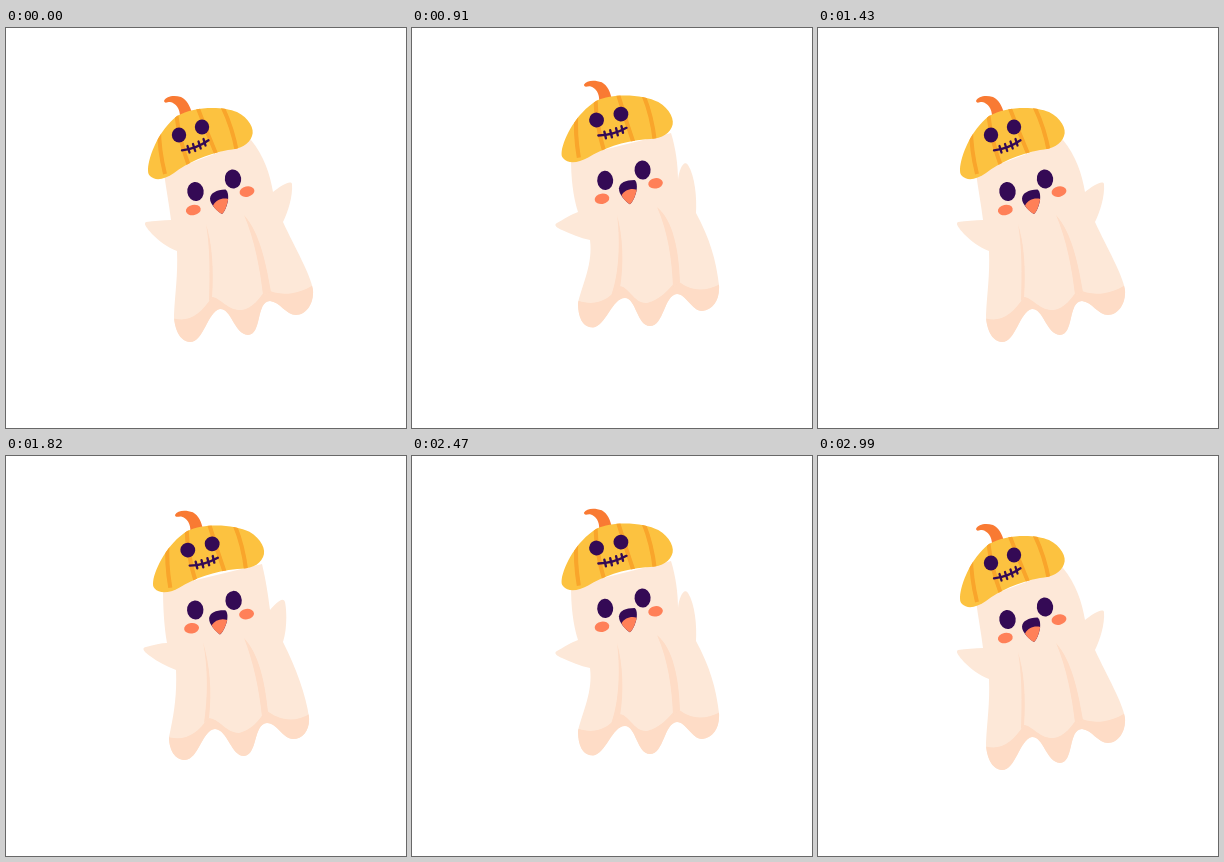
Write an HTML page that moves like this. It is 400 px wide and 400 px high and loops after 3.12 s.

```html
<!DOCTYPE html>
<html lang="en">
<head>
<meta charset="utf-8">
<title>Waving ghost</title>
<style>
  html, body { margin: 0; width: 100%; height: 100%; overflow: hidden; background: #fff; }
  svg { display: block; width: 100vw; height: 100vh; }
  .dark { fill: #340a55; }
  .coral { fill: #ff8058; }
  .shade { fill: #fedcc6; }
</style>
</head>
<body>
<svg viewBox="0 0 400 400">
  <defs>
    <clipPath id="bodyClip"><path class="outline"/></clipPath>
    <clipPath id="hatClip"><path id="hatShape" d="M142 141C143 127 153 102 171 88C188 78 217 78 231 84C243 90 249 101 246 108C243 117 234 121 222 122C200 126 181 135 168 145C158 152 149 153 144 148C142 146 142 144 142 141Z"/></clipPath>
  </defs>

  <path class="outline" fill="#fde8d8"/>
  <g class="shade" clip-path="url(#bodyClip)">
    <path id="hem"/>
    <path id="foldLeft"/>
    <path id="foldRight"/>
  </g>

  <g id="face">
    <g class="dark">
      <ellipse cx="189.5" cy="163.5" rx="8.2" ry="9.6" transform="rotate(-8 189.5 163.5)"/>
      <ellipse cx="227" cy="151" rx="8.2" ry="9.6" transform="rotate(-8 227 151)"/>
      <path d="M204 170.500C204.500 165 210 162 219.500 161.500C222 163 222.500 168 222 172C221 178 218.500 184 216 186C212 183.500 204 177 204 170.500Z"/>
    </g>
    <g class="coral">
      <path d="M207 177.500C210 172 216 169.500 222.200 171C221 178 218.500 184 216 186C212.500 184 209 181.500 207 177.500Z"/>
      <ellipse cx="187.3" cy="182" rx="7.5" ry="5.2" transform="rotate(-12 187.3 182)"/>
      <ellipse cx="241" cy="163.6" rx="7.5" ry="5.2" transform="rotate(-12 241 163.6)"/>
    </g>
  </g>

  <g id="hat">
    <path fill="#f97a33" d="M158 73C160 68 168 67 175 69C181 72 184 78 186 85L174 88C174 81 170 75 164 74C161 74 159 76 158 73Z"/>
    <use href="#hatShape" fill="#fcc240"/>
    <g clip-path="url(#hatClip)" fill="none" stroke="#f9a52b" stroke-width="4">
      <path d="M153 100Q153 122 159 146"/>
      <path d="M170 84Q173 112 183 138"/>
      <path d="M191 78Q200 102 211 128"/>
      <path d="M216 78Q226 98 231 124"/>
    </g>
    <g class="dark">
      <ellipse cx="173" cy="107" rx="7.2" ry="7.4"/>
      <ellipse cx="196" cy="99" rx="7.2" ry="7.4"/>
    </g>
    <g fill="none" stroke="#340a55" stroke-width="2.3" stroke-linecap="round">
      <path d="M176 122.3Q190 121 202.5 112.3"/>
      <path d="M181.500 118l2 6.500M187 116l2.200 7M192.500 113.500l2.200 7M197.500 111l2 6.500"/>
    </g>
  </g>
</svg>
<script>
  const STEP = 130, STEPS = 12;

  // Each shape is given low, halfway up and near the top of the swing.
  const shapes = {
    ".outline": [
      "M158 145C160 160 163 176 165 192C157 192 148 193 140 194C137 196 141 200 146 206C153 213 161 219 171 223C172 248 169 265 168 287C168 300 174 314 184 314C198 314 201 284 214 281C226 281 228 306 242 307C256 307 250 273 264 273C274 274 280 287 290 287C300 287 308 276 307 262C305 247 289 220 277 194C282 184 287 168 286 156C285 151 273 159 267 164C264 146 258 128 245 112Z",
      "M157 132C157 150 158 170 161 187C155 187 148 189 140 191C135 192 138 196 144 200C152 206 160 210 170 214C171 240 168 258 163 281C163 294 169 304 179 304C193 303 196 274 209 273C222 274 225 300 238 300C252 299 247 268 261 267C271 267 277 283 287 283C297 283 304 274 303 261C300 239 290 212 277 186C281 174 281 156 279 146C277 140 270 147 264 154C262 138 260 125 256 108Z",
      "M159 130C159 150 161 168 166 184C160 186 152 191 145 195C141 197 145 200 150 202C159 206 168 210 178 212C181 236 171 254 166 275C166 288 170 299.500 181 299.500C194 298 200 270 213 270C224 270 225 298 238 298C252 298 252 267 265 266C274 266 280 283 290 283C301 282 308 272 307 257C304 232 298 211 284 185C285 170 283 148 276 137C272 131 267 141 266 152C266 138 264 121 259 105Z"
    ],
    "#hem": [
      "M160 288C180 296 192 290 206 269C215 270 222 283 236 282C247 280 254 270 260 261C272 268 292 268 310 255L320 330L150 330Z",
      "M156 279C176 287 190 280 202 262C213 262 220 277 233 277C246 274 253 264 260 254C272 264 290 268 306 256L320 330L150 330Z",
      "M160 270C180 280 196 274 207 258C217 258 222 276 235 275C248 272 256 262 265 252C276 262 292 266 312 254L320 330L150 330Z"
    ],
    "#foldLeft": [
      "M200 196C206 215 208 240 206 270L203 273C204 245 204 220 200 196Z",
      "M197 186C204 210 206 235 203 262L198 267C202 240 202 212 197 186Z",
      "M205 187C211 208 212 236 208 260L199 268C206 250 209 218 205 187Z"
    ],
    "#foldRight": [
      "M238 187C254 205 260 235 265 264L257 267C254 240 248 210 238 187Z",
      "M238 182C253 198 259 226 262 256L256 261C253 232 247 205 238 182Z",
      "M245 179C261 192 267 222 268 254L261 259C260 232 256 204 245 179Z"
    ]
  };

  // Rigid parts: pivot x, pivot y, turn in degrees, widening.
  const parts = {
    "#face": [[213, 172, 0, 1], [212, 164.3, 4.5, 1], [215.7, 162.2, 3.2, 0.98]],
    "#hat": [[195, 112, 0, 1], [204.1, 100.8, 4.5, 1.035], [206.8, 98.9, 4.8, 1.035]]
  };

  // Parabola through the three poses, which sit at heights 0, 2 and 4.
  const weights = k => [(k - 2) * (k - 4) / 8, k * (4 - k) / 4, k * (k - 2) / 8];
  const blend = (values, w) => values.reduce((sum, v, i) => sum + v * w[i], 0);

  function blendPaths(paths, w) {
    const numbers = paths.map(p => p.match(/[\d.]+/g));
    let i = 0;
    return paths[0].replace(/[\d.]+/g, () => {
      const value = blend(numbers.map(list => list[i]), w);
      i++;
      return value.toFixed(2) + " ";
    });
  }

  function draw(k) {
    const w = weights(k);
    for (const [selector, paths] of Object.entries(shapes)) {
      const d = blendPaths(paths, w);
      document.querySelectorAll(selector).forEach(el => el.setAttribute("d", d));
    }
    for (const [selector, poses] of Object.entries(parts)) {
      const [x, y, turn, wide] = poses[0].map((_, i) => blend(poses.map(p => p[i]), w));
      const [px, py] = poses[0];
      document.querySelector(selector).setAttribute("transform",
        `translate(${x} ${y}) rotate(${turn}) scale(${wide} 1) translate(${-px} ${-py})`);
    }
  }

  let shown = -1;
  function tick() {
    const n = Math.floor(performance.now() / STEP) % STEPS;
    const k = Math.min(n, STEPS - 1 - n);
    if (k !== shown) draw(shown = k);
    requestAnimationFrame(tick);
  }
  tick();
</script>
</body>
</html>
```
